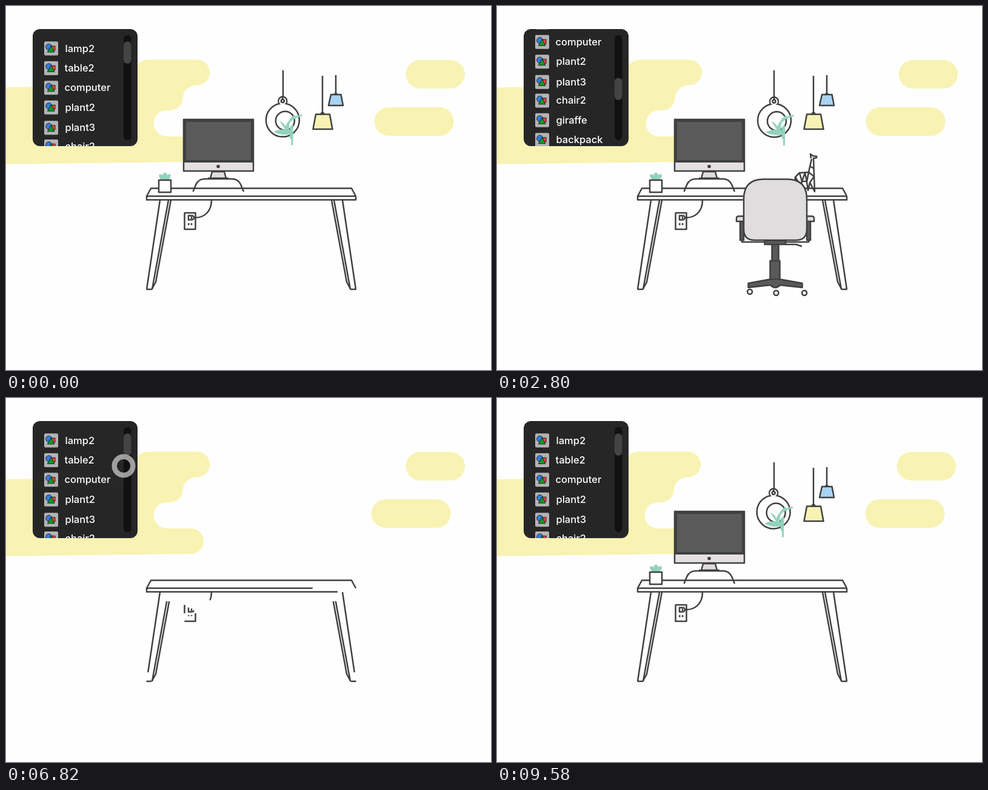
An HTML page for the animation above (9600 ms loop, 800 by 600 pixels).

```html
<!DOCTYPE html>
<html lang="en">
<head>
<meta charset="utf-8">
<title>Desk builder</title>
<style>
html, body { margin: 0; width: 100%; height: 100%; overflow: hidden; background: #fefefe; }
svg { display: block; width: 100vw; height: 100vh; }
text { font: 500 16.5px Inter, Roboto, sans-serif; fill: #fff; }
.line { fill: none; stroke: #404040; stroke-width: 2.5; stroke-linejoin: round; }
.white { fill: #fff; }
.dark { fill: #5a5a5a; }
.ink { fill: #404040; stroke: none; }
.grey { fill: #dfdddd; }
.cloud { fill: #f8f3b3; }
.leaf { fill: #92d3bd; stroke: none; }
.stem { fill: none; stroke: #92d3bd; stroke-width: 3; stroke-linecap: round; }
</style>
</head>
<body>
<svg viewBox="0 0 800 600">
  <defs>
    <clipPath id="panelClip"><rect x="44" y="38" width="173" height="193" rx="12"/></clipPath>
    <g id="icon" stroke="#222">
      <rect x="63" y="-11.5" width="23" height="23" rx="2" fill="#b3b3b3" stroke="none"/>
      <rect x="74.5" y="-4" width="6.5" height="7" fill="#ee4340"/>
      <circle cx="70.7" cy="-2.5" r="5" fill="#2f7fe8"/>
      <path d="M74.3 -4.5L80 6H68.3Z" fill="#139a25"/>
    </g>
  </defs>

  <path id="cloudLeft" class="cloud" d="M-20 134.5L219 131V110A21 21 0 0 1 240 88.5H322a21 21 0 0 1 0 42A23 21 0 0 0 298.5 151A21 21 0 0 1 277 172H272a21.5 21.5 0 0 0 0 43H312a21 21 0 0 1 0 42L-20 261Z"/>
  <rect id="cloudTop" class="cloud" y="89" width="97.5" height="47" rx="23.5"/>
  <rect id="cloudLow" class="cloud" y="167" width="131" height="47" rx="23.5"/>

  <g clip-path="url(#panelClip)">
    <rect x="44" y="38" width="173" height="193" fill="#262626"/>
    <g id="list"></g>
    <rect x="194" y="48" width="12.5" height="173" rx="6.2" fill="#111"/>
    <rect id="thumb" x="194" width="12.5" height="36.5" rx="6.2" fill="#444"/>
  </g>

  <circle id="cursor" fill="none" stroke="#c8c8c8"/>

  <g class="line">
    <g class="table">
      <path pathLength="1" d="M577 313.5L570 300.5H239L232 313.5H577"/>
      <path pathLength="1" d="M232 313.5V319.5H577V313.5"/>
      <g id="leg">
        <path pathLength="1" d="M254 320L232 467"/>
        <path pathLength="1" d="M231.5 467H241"/>
        <path pathLength="1" d="M241 467L268 320"/>
        <path pathLength="1" d="M240.5 467L247 455L272 320"/>
      </g>
      <use href="#leg" transform="translate(809) scale(-1 1)"/>
    </g>
    <g class="outlet">
      <path pathLength="1" d="M294.5 341V369"/>
      <path pathLength="1" d="M294.5 368H312.5V341H294"/>
      <path pathLength="1" d="M301 345.5V352.5H306.5a3.5 3.5 0 0 0 0 -7H300M306 347v4"/>
      <path pathLength="1" d="M301.3 357.8v3.5"/>
      <path pathLength="1" d="M306 357.8v3.5"/>
    </g>
    <g class="wire"><path pathLength="1" d="M339 320C339 338 328 349 311 349"/></g>

    <path id="arc" d="M308.5 306L313 295Q317 285 328 285H372Q383 285 387 294L392 306"/>
    <g id="monitor">
      <path class="grey" d="M340 273H360L363 284H337Z"/>
      <path d="M333 284H367"/>
      <rect x="293" y="187" width="115" height="85" fill="#e4dfe1"/>
      <rect class="ink" x="293" y="187" width="115" height="71"/>
      <rect class="dark" stroke="none" x="297" y="191" width="107" height="63"/>
      <circle class="ink" cx="350" cy="264.5" r="2.8"/>
    </g>

    <g id="pot">
      <path class="leaf" d="M256 287Q251 281 253 277Q256 277 258 279Q259 275 262 274.5Q265 275 266.5 279Q269 276 271.5 277.5Q273 281 268 287Z"/>
      <rect class="white" x="252" y="287" width="20" height="20"/>
    </g>

    <g id="planter">
      <path id="cord"/>
      <g id="ring">
        <circle cx="457" cy="157.5" r="7"/>
        <circle class="white" cx="457.5" cy="189" r="27.5"/>
        <circle class="white" stroke="none" cx="457" cy="158" r="5.8"/>
        <path d="M457 149V155"/>
        <circle cx="457" cy="157.5" r="2.5"/>
        <circle class="white" cx="461.5" cy="190" r="15.5"/>
        <path class="leaf" d="M443 208Q456 202 472 205Q477 210 466 213Q452 214 443 208Z"/>
        <path class="leaf" d="M464 207Q458 199 452 190Q464 195 464 207Z"/>
        <path class="stem" d="M463 205Q464 187 488 181M467 204Q465 190 477 182M471 200V218M473.5 198V229"/>
      </g>
    </g>

    <g id="lamps">
      <path d="M522 115V177M544 114V144"/>
      <path class="ink" d="M518.5 178a3.5 3.5 0 0 1 7 0ZM541 146a3 3 0 0 1 6 0Z"/>
      <path fill="#f8f3b3" d="M511 178.5H534L538.5 203H506.5Z"/>
      <path fill="#a9d3f3" d="M536 146H552.5L556 164H532Z"/>
    </g>

    <g id="giraffe">
      <path d="M518 251L517 244L521 247L527.5 248L526.5 250.5L522 251L524 306L516 291L513 304L511 290L514 274L519 252"/>
      <path d="M514 274L499 275L492 282L490 305L497 290L499 305L503 289L499 275M492 282L497 290"/>
      <path d="M514 274L523 281L516 291M495 305L503 289H511L508 275L503 289M516 264L523 268"/>
    </g>

    <g id="chair">
      <path class="white" d="M404 384V389H514V384"/>
      <path class="dark" d="M401 354h6v32h-6ZM511 354h6v32h-6ZM453.5 393h11v27h-11ZM450.5 420h16v31h-16Z"/>
      <path class="grey" d="M395 355V350Q395 346.5 399 346.5H407V355ZM523 355V350Q523 346.5 519 346.5H511V355Z"/>
      <path class="grey" d="M407 318Q407 285.5 440 285.5H478Q511 285.5 511 318V368Q511 386 493 386H425Q407 386 407 368Z"/>
      <path class="dark" d="M441.5 386.5h34.5v6.5h-34.5Z"/>
      <path d="M476 393H493L503 396"/>
      <path class="dark" d="M450 450.5H467L503.5 457V464L467 460Q459 468 451 460L414.5 464V457Z"/>
      <g class="white"><circle cx="417" cy="471" r="4"/><circle cx="460.5" cy="473" r="4"/><circle cx="507" cy="473" r="4"/></g>
    </g>
  </g>
</svg>
<script>
const LOOP = 9600, SCROLL = 75.5;
const $ = id => document.getElementById(id);
const clamp = u => Math.min(1, Math.max(0, u));
const ramp = (t, start, length) => clamp((t - start) / length);
const smooth = u => u * u * (3 - 2 * u);
const easeOut = u => 1 - (1 - u) ** 3;
const lerp = (a, b, u) => a + (b - a) * u;
const wave = (t, period, peak) => Math.cos(2 * Math.PI * (t / period - peak));

const names = ['lamp2', 'table2', 'computer', 'plant2', 'plant3', 'chair2', 'giraffe', 'backpack'];
const rowY = i => 70 + 32.4 * i - (i > 4 ? .6 : 0) + (i === 4 ? 1.2 : 0);
$('list').innerHTML = names.map((name, i) => `<g transform="translate(0 ${rowY(i)})">
  <rect class="glow" x="44" y="-14" width="150" height="28" fill="#fff" fill-opacity="0"/>
  <use href="#icon"/><text x="${i === 1 || i === 2 ? 96.5 : 97.5}" y="5.5">${name}</text></g>`).join('');
const glows = [...document.querySelectorAll('.glow')];

// Each drag takes a list row to (x, y); objects then grow to their home place and leave later
const drags = [
  { row: 6, pick: 850, drop: 1150, x: 505, y: 285, id: 'giraffe', home: [508, 276], small: .4, grow: 580, leave: 4050 },
  { row: 5, pick: 1440, drop: 1640, x: 413, y: 461, id: 'chair', home: [459, 381], small: .15, grow: 890, leave: 3940, fades: true },
  { row: 1, pick: 5750, drop: 6250, x: 405, y: 310 },
  { row: 2, pick: 6940, drop: 7450, x: 350, y: 240 },
  { row: 3, pick: 7910, drop: 8300, x: 262, y: 292, id: 'pot', home: [262, 291], small: .9, grow: 300, leave: 4350 },
  { row: 4, pick: 8500, drop: 8730, x: 457, y: 185, id: 'planter', home: [457, 168], small: .25, grow: 400, leave: 4250 },
  { row: 0, pick: 8880, drop: 9080, x: 530, y: 160, id: 'lamps', home: [531, 160], small: .3, grow: 420, leave: 4150 }];

const moves = [];
const move = (time, x, y, press = 0, alpha = 1) => moves.push({ time, x, y, press, alpha });
move(0, 430, 405, 0, 0);
move(130, 430, 405);
move(430, 200, 77);
move(480, 200, 77, 1);
move(780, 200, 137, 1);
move(5250, 320, 300, 0, 0);
move(5400, 320, 300);
move(6820, 194, 112);
move(7980, 180.5, 178, 1);
move(9300, 430, 415);
move(9420, 430, 415, 0, 0);
move(LOOP, 430, 405, 0, 0);
for (const { row, pick, drop, x, y, fades } of drags) {
  const from = rowY(row) - (pick < 4000 ? SCROLL : 0);
  move(pick - 60, 180, from);
  move(pick, 180, from, 1);
  move(drop, x, y, 1);
  move(drop + 80, x, y, 0, fades ? 0 : 1);
}
moves.sort((a, b) => a.time - b.time);

function cursorAt(t) {
  const i = Math.max(1, moves.findIndex(m => m.time >= t));
  const a = moves[i - 1], b = moves[i], u = smooth(ramp(t, a.time, b.time - a.time));
  const mix = key => lerp(a[key], b[key], u);
  return { x: mix('x'), y: mix('y'), press: mix('press'), alpha: mix('alpha') };
}

function place(id, x, y, dx, dy, scale) {
  $(id).setAttribute('transform', `translate(${x} ${y}) scale(${scale}) translate(${-dx} ${-dy})`);
  $(id).style.display = scale > .001 ? '' : 'none';
}

function drawObject({ id, home: [x, y], small, pick, drop, grow, leave }, t) {
  const wraps = pick > leave, picked = t >= pick;
  const stay = scale => place(id, x, y, x, y, scale);
  if (!picked && !wraps) return stay(0);
  if (wraps ? !picked : t > leave) return stay(1 - smooth(ramp(t, leave, 350)));
  const hand = cursorAt(Math.min(t, drop)), u = easeOut(ramp(t, drop, grow));
  place(id, lerp(hand.x, x, u), lerp(hand.y, y, u), x, y, lerp(small, 1, u));
}

function drawLines(name, p) {
  for (const path of document.querySelectorAll(`.${name} path`)) {
    path.style.strokeDasharray = p < 1 ? `${p} 2` : 'none';
    path.style.visibility = p > 0 ? '' : 'hidden';
  }
}

function render(t) {
  const slide = (1 - wave(t, 3200, .062)) / 2, drift = wave(t, 2400, .11);
  $('cloudLeft').setAttribute('transform', `translate(${7.3 * slide - 7.1})`);
  $('cloudTop').setAttribute('x', 659 + 11.6 * slide);
  $('cloudLow').setAttribute('x', 603.3 + 5.6 * drift);

  const scroll = SCROLL * (smooth(ramp(t, 480, 300)) - smooth(ramp(t, 4000, 1050)));
  $('list').setAttribute('transform', `translate(0 ${-scroll})`);
  $('thumb').setAttribute('y', 58.5 + scroll * 60 / SCROLL);
  for (const { row, pick } of drags)
    glows[row].setAttribute('fill-opacity', .27 * (ramp(t, pick - 120, 100) - ramp(t, pick + 170, 200)));

  const { x, y, press, alpha } = cursorAt(t), hole = 11 * (1 - press);
  const ring = { cx: x, cy: y, r: (19.5 + hole) / 2, 'stroke-width': 19.5 - hole, opacity: .75 * alpha };
  for (const key in ring) $('cursor').setAttribute(key, ring[key]);

  const late = t > 5200;
  drawLines('table', late ? 1 - (1 - ramp(t, 6250, 750)) ** 1.6 : 1 - ramp(t, 4300, 560));
  drawLines('outlet', late ? ramp(t, 6500, 650) : 1 - ramp(t, 4350, 620));
  drawLines('wire', late ? ramp(t, 6650, 570) : 1 - ramp(t, 4350, 620));
  drags.filter(d => d.id).forEach(d => drawObject(d, t));

  const bob = 4 * (drift - 1), since = (t - 8730 + LOOP) % LOOP;
  const sway = -6 * Math.exp(-since / 500) * Math.cos(since / 270 * Math.PI);
  $('ring').setAttribute('transform', `rotate(${sway} 457 107) translate(0 ${bob})`);
  $('cord').setAttribute('d', `M457 106V${152 + bob}`);

  const left = 1 - smooth(ramp(t, 4300, 350));
  place('monitor', 350, 285, 350, 285, late ? easeOut(ramp(t, 8050, 500)) : left);
  const lift = late ? 78 * (1 - ramp(t, 7850, 250)) ** 2 : 0;
  place('arc', 350, 306 - lift, 350, 306, late ? +(t > 7850) : left);
  $('arc').style.opacity = late ? ramp(t, 7850, 100) : 1;
}

function frame() {
  render(performance.now() % LOOP);
  requestAnimationFrame(frame);
}
frame();
</script>
</body>
</html>
```
